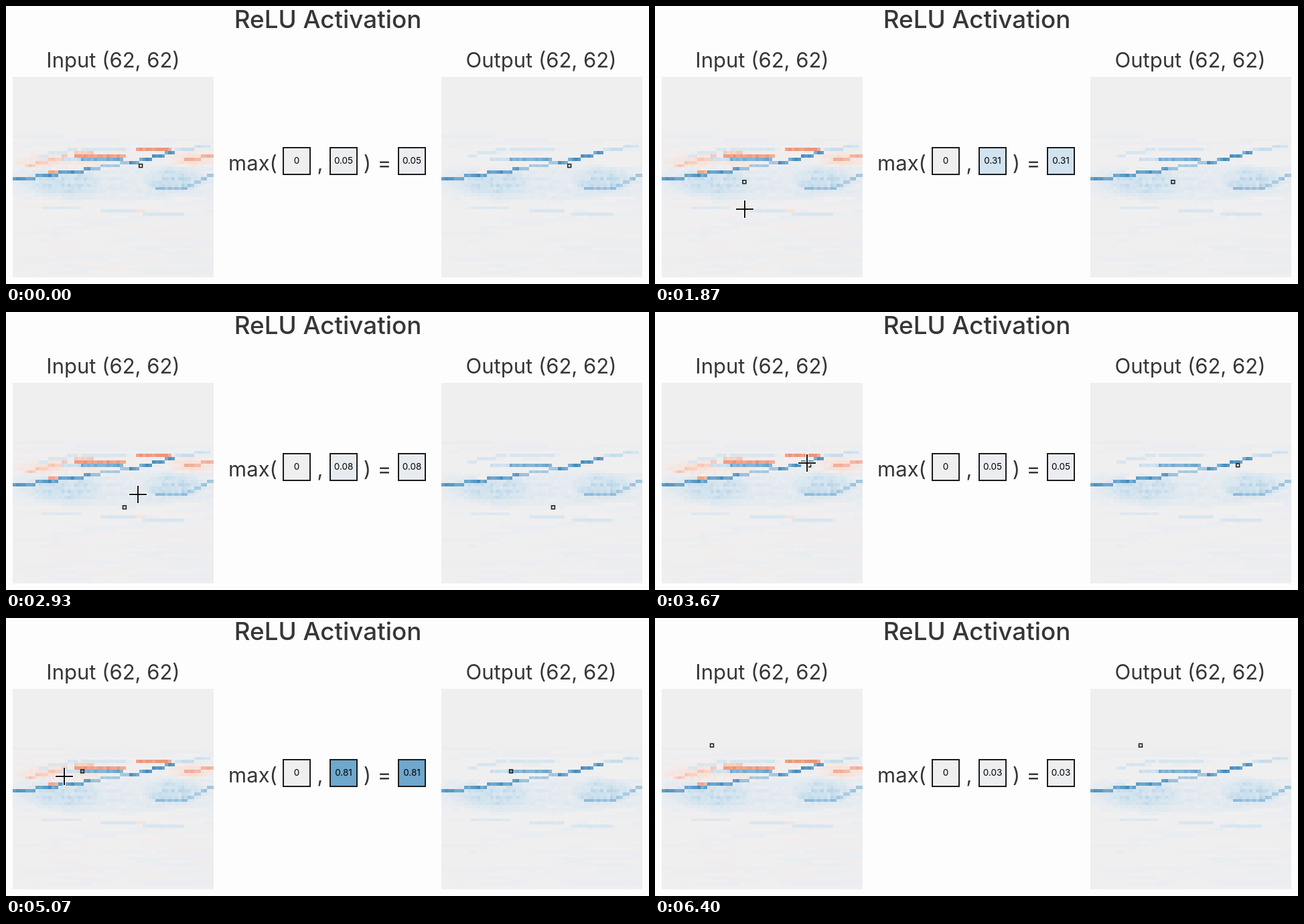
An HTML page with a canvas that plays this animation: 960x416 px, repeating every 6.47 s.

```html
<!DOCTYPE html>
<html lang="en">
<head>
<meta charset="utf-8">
<title>ReLU Activation</title>
<style>
html, body { margin: 0; width: 960px; height: 416px; overflow: hidden; background: #fdfdfd; }
canvas { display: block; }
</style>
</head>
<body>
<canvas id="stage" width="960" height="416"></canvas>
<script>
const ctx = document.getElementById('stage').getContext('2d');
const N = 62, SIZE = 300, CELL = SIZE / N, TOP = 106, LEFT = 10, RIGHT = 650;
const LOOP = 6470, STEP = 200 / 3, LAG = 2 * STEP;
const INK = '#363636', PAPER = '#fdfdfd';

let seed = 7;
const rand = () => (seed = (seed * 16807) % 2147483647) / 2147483647;

// Values of the picture: faint runs, soft glows, then sharp ridges
const field = Array.from({ length: N }, () => new Array(N).fill(0));

function faintRuns() {
  for (let r = 18; r < N; r++)
    for (let c = 0, v = 0; c < N; c++) {
      if (rand() < 0.12) v = (rand() - 0.35) * 0.1;
      field[r][c] = v;
    }
}

function glow(value, col, row, rx, ry) {
  for (let r = 0; r < N; r++)
    for (let c = 0; c < N; c++) {
      const d = Math.hypot((c - col) / rx, (r - row) / ry);
      if (d < 1) field[r][c] += value * Math.min(1, 2 - 2 * d) * (0.65 + 0.7 * rand());
    }
}

function ridge(value, c0, r0, c1, r1) {
  for (let c = c0; c <= c1; c++) {
    const r = Math.round(r0 + (r1 - r0) * (c - c0) / (c1 - c0));
    field[r][c] = value * (0.8 + 0.25 * rand());
  }
}

faintRuns();
glow(0.12, 30, 32, 50, 7);     // haze below the ridges
glow(0.16, 15, 32, 13, 6);     // left slope
glow(0.2, 49, 31, 10, 5);      // right bowl
glow(-0.2, 16, 26, 19, 3);
glow(-0.2, 55, 25, 9, 3);
ridge(0.25, 8, 24, 19, 22);    // upper edge
ridge(0.25, 21, 22, 34, 22);
ridge(0.35, 50, 22, 60, 21);
ridge(-0.5, 4, 27, 16, 24);    // warm ridges
ridge(-0.5, 19, 23, 24, 23);
ridge(-0.9, 19, 24, 34, 24);
ridge(-0.9, 38, 22, 48, 22);
ridge(-0.8, 11, 29, 15, 29);
ridge(-0.7, 53, 25, 61, 24);
ridge(0.95, 0, 31.3, 24, 28.2);  // cool ridges
ridge(0.6, 24, 28, 35, 26);
ridge(0.35, 15, 25, 20, 25);
ridge(0.8, 21, 25, 33, 25);
ridge(0.95, 36, 26, 49, 23);
ridge(0.4, 42, 33, 45, 34);    // bowl rim
ridge(0.65, 44, 34, 53, 34);
ridge(0.6, 54, 33, 61, 30);
ridge(0.2, 9, 40, 20, 40);
ridge(0.25, 27, 41, 52, 42);
ridge(-0.2, 38, 41, 40, 41);

// Known moments: time, pointer x and y, highlighted column and row, value there
const moments = [
  [1000, 146, 222, 29, 21, -0.02], [1870, 134, 305, 25, 32, 0.31],
  [2930, 197, 273, 34, 38, 0.08], [4330, 153, 230, 33, 25, 0.72],
  [5070, 86, 237, 21, 25, 0.81]
];
const first = [39, 27, 0.05], last = [15, 17, 0.03];

// The highlight trails the pointer on the same path
const center = (c, r) => [LEFT + (c + 0.5) * CELL, TOP + (r + 0.5) * CELL];
const path = [[-LAG, ...center(...first)]];
for (const [t, x, y, c, r] of moments) path.push([t - LAG, ...center(c, r)], [t, x, y]);
path.push([6400 - LAG, ...center(...last)]);
for (const [c, r, v] of [first, last, ...moments.map(m => m.slice(3))]) field[r][c] = v;

const slope = (a, b, j) => (b[j] - a[j]) / (b[0] - a[0]);

// Velocity at a point is that of its shorter neighbouring stretch
function velocity(i, j) {
  const p = path[i], before = path[i - 1], after = path[i + 1];
  if (!before) return slope(p, after, j);
  if (!after) return slope(before, p, j);
  return p[0] - before[0] < after[0] - p[0] ? slope(before, p, j) : slope(p, after, j);
}

function position(t) {
  let i = 0;
  while (i < path.length - 2 && t >= path[i + 1][0]) i++;
  const a = path[i], b = path[i + 1], span = b[0] - a[0];
  const k = Math.min(1, (t - a[0]) / span), q = 1 - k;
  return [1, 2].map(j =>
    a[j] * q * q * (1 + 2 * k) + b[j] * k * k * (3 - 2 * k) +
    span * k * q * (q * velocity(i, j) - k * velocity(i + 1, j)));
}

const stops = [
  [-1, 234, 140, 112], [-0.35, 250, 217, 202], [0, 240, 239, 240],
  [0.31, 209, 227, 239], [0.72, 133, 181, 214], [1, 66, 138, 186]
];

function color(v) {
  v = Math.max(-1, Math.min(1, v));
  let i = 1;
  while (v > stops[i][0]) i++;
  const a = stops[i - 1], b = stops[i];
  return `rgb(${[1, 2, 3].map(j => Math.round(a[j] + slope(a, b, j) * (v - a[0])))})`;
}

function heatmap(map) {
  const img = document.createElement('canvas');
  img.width = img.height = N;
  const g = img.getContext('2d');
  field.forEach((row, r) => row.forEach((v, c) => {
    g.fillStyle = color(map(v));
    g.fillRect(c, r, 1, 1);
  }));
  return img;
}
const relu = v => Math.max(0, v);
const input = heatmap(v => v), output = heatmap(relu);

function text(str, x, y, size, weight = 400, fill = INK) {
  ctx.font = `${weight} ${size}px Inter, "Open Sans", sans-serif`;
  ctx.textAlign = 'center';
  ctx.fillStyle = fill;
  ctx.fillText(str, x, y);
}

function valueBox(x, v) {
  ctx.fillStyle = color(v);
  ctx.fillRect(x, 212, 40, 40);
  ctx.strokeStyle = '#1c1c1c';
  ctx.lineWidth = 2;
  ctx.strokeRect(x, 212, 40, 40);
  text(String(+v.toFixed(2) || 0), x + 20, 236, 13.5, 400, '#000');
}

function marker(left, c, r) {
  ctx.strokeStyle = '#222';
  ctx.lineWidth = 1.6;
  ctx.strokeRect(left + c * CELL, TOP + r * CELL, CELL, CELL);
}

function crosshair(x, y) {
  x = Math.round(x);
  y = Math.round(y);
  for (const [fill, w, len] of [['#fff', 4, 28], ['#111', 2, 26]]) {
    ctx.fillStyle = fill;
    ctx.fillRect(x - len / 2, y - w / 2, len, w);
    ctx.fillRect(x - w / 2, y - len / 2, w, len);
  }
}

const cell = d => Math.max(0, Math.min(N - 1, Math.floor(d / CELL)));

function draw(t) {
  ctx.fillStyle = PAPER;
  ctx.fillRect(0, 0, 960, 416);
  ctx.imageSmoothingEnabled = false;
  ctx.drawImage(input, LEFT, TOP, SIZE, SIZE);
  ctx.drawImage(output, RIGHT, TOP, SIZE, SIZE);

  text('ReLU Activation', 480.5, 33, 36.8, 500);
  text('Input (62, 62)', 160, 92, 31);
  text('Output (62, 62)', 799, 92, 31);
  text('max(', 368.5, 246, 31);
  text(',', 469, 246, 31);
  text(')', 539.5, 246, 31);
  text('=', 565, 246, 31);

  const [x, y] = position(t - LAG);
  const c = cell(x - LEFT), r = cell(y - TOP), v = field[r][c];
  valueBox(414, 0);
  valueBox(484, v);
  valueBox(586, relu(v));
  marker(LEFT, c, r);
  marker(RIGHT, c, r);
  if (t > 0 && t < 6390) crosshair(...position(t));
}

function tick(now) {
  draw(Math.floor((now % LOOP) / STEP + 0.06) * STEP);
  requestAnimationFrame(tick);
}
draw(0);
requestAnimationFrame(tick);
</script>
</body>
</html>
```
